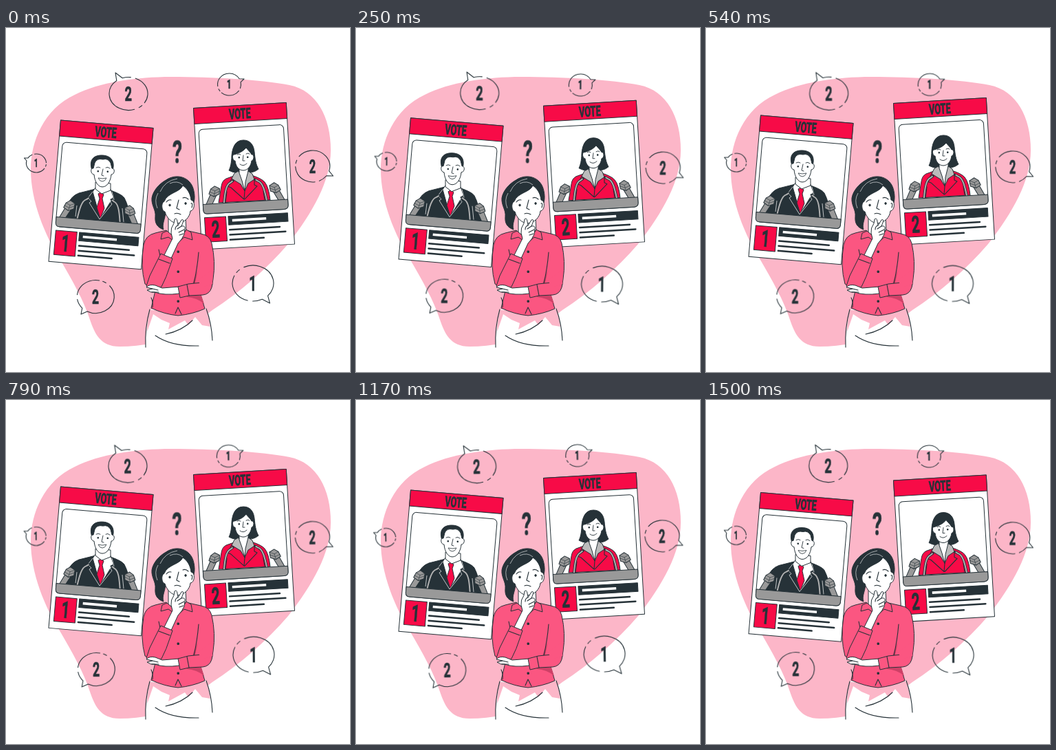
An HTML page that plays this animation: 500 by 500 pixels, repeating every 1540 ms.

```html
<!DOCTYPE html>
<html lang="en">
<head>
<meta charset="utf-8">
<title>Vote</title>
<style>
html, body { margin: 0; width: 100%; height: 100%; overflow: hidden; background: #fff; }
svg { display: block; width: 100%; height: 100%; }
.line { fill: none; stroke: #263238; stroke-width: 1.1; stroke-linecap: round; stroke-linejoin: round; }
.ink { fill: #263238; stroke: #263238; stroke-linejoin: round; }
.white { fill: #fff; stroke: #263238; stroke-linejoin: round; }
.red { fill: #f70b47; stroke: #263238; stroke-linejoin: round; }
.pink { fill: #fb5681; stroke: #263238; stroke-linejoin: round; }
.gray { fill: #999; stroke: #263238; stroke-linejoin: round; }
.shade { fill: #cf4067; }
text {
  font-family: Roboto, "Liberation Sans", sans-serif; font-weight: 700;
  text-anchor: middle; fill: #263238; stroke: #263238; stroke-width: .7;
}
.float { animation: float 1540ms linear -70ms infinite; }
.wind { transform-origin: 250px 243px; animation: wind 1540ms linear -70ms infinite; }
@keyframes float {
  0%, 100% { transform: translateY(.9px); }
  50% { transform: translateY(-9.1px); }
}
@keyframes wind {
  0%, 100% { transform: rotate(0deg); }
  25% { transform: rotate(1deg); }
  75% { transform: rotate(-1deg); }
}
</style>
</head>
<body>
<svg viewBox="0 0 500 500">
  <defs>
    <g id="card">
      <path class="white" d="M0 0H135V206H0Z"/>
      <path class="red" d="M0 0H135V23H0Z"/>
      <rect class="white" x="5.5" y="31.5" width="123.5" height="123" rx="6"/>
      <path class="red" d="M6.500 160H37.500V195.500H6.500Z"/>
      <path class="ink" stroke="none" d="M41 160H127.500V172.500H41Z"/>
      <path d="M46.500 166.200H96" stroke="#fff" stroke-width="3.6"/>
      <path class="line" style="stroke-width:2.500" d="M42 179.600H115M42 186.800H123M42 194H91"/>
    </g>
    <g id="mic">
      <path class="line" style="stroke-width:3.600" d="M51 109L47 111.500C40 114 38 128 36 141"/>
      <path class="line" style="stroke:#b3b3b3;stroke-width:1.900" d="M50 109.500L47 111.500C40 114 38 128 36 141"/>
      <path class="gray" d="M18 125L26 128L19 141H10Z"/>
      <path class="gray" d="M18 119L24 115L31 119L30 127L22 130L15 126Z"/>
      <path class="line" style="stroke-width:.6" d="M18 119L24 122L31 119M24 122L22 130M16 123L23 126L30 123"/>
    </g>
    <g id="desk">
      <use href="#mic"/>
      <use href="#mic" transform="matrix(-1 0 0 1 134.500 0)"/>
      <path class="gray" d="M5.500 140.500H129V149Q129 154.500 123 154.500H11Q5.500 154.500 5.500 149Z"/>
    </g>
  </defs>

  <path fill="#fcb6c8" d="M36 205C36 165 55 118 100 97C135 79 190 71 240 71C300 71 372 75 412 83C452 91 472 130 472 178C472 222 446 268 410 314C378 351 340 384 300 410C268 434 235 463 165 463C137 463 129 444 122 424C113 396 97 368 79 337C56 300 36 252 36 205Z"/>

  <g transform="rotate(-.18 250 243)"><g class="wind" id="bubbles"></g></g>

  <!-- first candidate -->
  <g class="float">
    <use href="#card" transform="translate(79.500 134) rotate(4.870)"/>
    <path class="ink" d="M130 234L106 240Q95 244 90 256L81 275L182 285Q179 260 172 247Q169 242 152 236Z"/>
    <path class="white" d="M130 232L126 238L137 277L156 246L152 234Z"/>
    <path class="red" d="M134 241L138 239L142 242L140 248L143 262L137 277L132 261L136 248Z"/>
    <path fill="none" stroke="#fff" stroke-width=".7" d="M126 238L119 247L124 252L121 254L136 278L154 256L151 252L157 250L154 238M103 258L101 274M169 262L171 282"/>
    <path class="white" d="M130 224V234L139 241L152 236V226Z"/>
    <path class="ink" d="M125 207C120 192 127 185 139 185C152 185 159 193 155 207Z"/>
    <path class="white" d="M127 204C122 203 123 213 128 213C129 224 134 231 140 231C147 231 152 223 153 213C158 213 159 204 154 204L152 196Q148 189 141 191Q132 189 129 196Z"/>
    <path class="line" style="stroke-width:.9" d="M131 203Q134 201 137 203M145 203Q148 201 151 204M141 205L139 214L142 215"/>
    <path class="white" stroke-width=".8" d="M134 218Q140 220 146 218Q144 223 140 223Q136 223 134 218Z"/>
    <path class="ink" stroke="none" d="M133 207.500h1.500v1.500h-1.500zM147 208h1.500v1.500h-1.500z"/>
    <use href="#desk" transform="translate(79.500 134) rotate(4.870)"/>
    <g transform="translate(79.500 134) rotate(4.870)" data-labels="VOTE,66.800,11.800,21 1,22,177.500,34"></g>
  </g>

  <!-- second candidate -->
  <g class="float">
    <use href="#card" transform="translate(272.500 116.500) rotate(-3.400)"/>
    <path class="ink" d="M345 163C333 163 329 174 328 186C328 196 326 203 324 207Q333 212 345 210Q359 212 367 205C363 198 362 190 361 180C360 170 355 163 345 163Z"/>
    <path class="red" d="M334 214L320 219Q314 222 313 230L309 254L384 250Q382 231 376 224Q372 219 357 214Z"/>
    <path class="white" d="M339 200V210L335 214L347 235L356 214L352 209V200Z"/>
    <path fill="#bbb" stroke="#263238" d="M338 208L332 211L328 219L341 227L347 237L343 222ZM352 208L358 212L361 220L352 226L347 237L348 224Z"/>
    <path class="line" d="M328 219L322 230L327 232L346 249L347 237M347 249L365 230L361 228L361 220M374 237L376 250M321 238L319 253"/>
    <path class="white" d="M332 184C328 183 329 193 333 193C334 202 339 207 345 207C351 207 356 201 357 193C361 192 361 183 357 184C355 180 352 178 349 174C344 180 338 182 332 184Z"/>
    <path class="line" style="stroke-width:.9" d="M336 184Q339 182 341 184M349 183Q352 181 354 183M345 185L344 193L347 193M340 198Q345 202 350 197"/>
    <path class="ink" stroke="none" d="M338 187.500h1.500v1.500h-1.500zM350.500 187h1.500v1.500h-1.500z"/>
    <use href="#desk" transform="translate(272.500 116.500) rotate(-3.400)"/>
    <g transform="translate(272.500 116.500) rotate(-3.400)" data-labels="VOTE,66.800,11.800,21 2,21.800,177.500,34"></g>
  </g>

  <!-- voter -->
  <g>
    <path fill="#fff" d="M209 409C204 427 202 445 203 464L222 460Q250 466 280 462L300 455Q299 430 291 408Z"/>
    <path fill="#fcb6c8" d="M209 410L291 409Q295 420 297 434L285 432L275 420L265 432L260 425L236 438L238 429L226 424L214 416L205 442Q205 424 209 410Z"/>
    <path class="line" d="M209 409C204 427 202 445 203 464M291 408Q299 430 300 454M232 445Q256 440 271 425M217 447Q240 463 280 462"/>

    <path class="ink" d="M240 218C226 222 214 235 212 247C211 258 218 264 217 274C216 284 220 290 229 293C226 285 232 277 232 266Z"/>
    <path class="white" d="M236 275V297L248 313L262 297L261 274Z"/>
    <path class="pink" d="M233 294L217 298Q203 301 200 315Q195 346 202 372L217 382L211 407Q230 416 250 418Q271 416 289 408L283 388Q300 386 301 365Q305 340 299 313Q296 301 283 299L261 294L248 312Z"/>
    <path class="shade" d="M266 389L284 389L288 401Q278 392 262 391ZM279 351L275 371L271 372Z"/>
    <path class="line" d="M222 322L224 331M280 326Q278 350 273 371M211 392Q214 398 213 406M250 406L246 415M250 406L255 416"/>
    <path class="ink" stroke="none" d="M249 324h2.400v2.400h-2.400zM249 353h2.400v2.400h-2.400zM249 396h2.400v2.400h-2.400z"/>

    <path class="ink" d="M231 266C220 250 222 226 236 219C252 211 270 219 273 237C275 246 274 253 271 259Z"/>
    <path class="white" d="M230 252C225 254 226 266 231 267C234 277 241 283 249 284C260 283 267 275 268 266C274 266 276 251 269 250C268 240 263 233 257 229C253 239 235 239 230 252Z"/>
    <path fill="none" stroke="#fff" stroke-width=".6" d="M224 238Q231 222 249 219M257 228Q249 221 238 226M221 240Q215 250 220 262"/>
    <path class="line" d="M233 253Q236 249 240 250M257 247Q261 245 265 249M251 250L248 262L252 264M245 270Q249 268 254 271M269 255Q272 254 270 261"/>
    <path class="ink" stroke="none" d="M238 256a1.200 1.500 0 1 0 .1 0zM261 253.500a1.200 1.500 0 1 0 .1 0z"/>

    <path class="pink" d="M234 295L227 298L225 307L236 304L249 313L240 300ZM262 293L269 297L271 308L259 304L249 313L257 301Z"/>
    <path class="white" d="M229 332L242 306L240 298Q239 291 244 284L245 278Q248 275 249 281L250 287L255 279Q259 277 257 283L255 288Q261 287 260 292L259 300Q256 307 250 313L239 337Z"/>
    <path class="line" d="M250 287Q246 288 246 293M255 288L249 292M259 293L251 297M258 299L252 301"/>
    <path class="pink" d="M225 328L242 335L239 344Q233 363 226 376Q215 384 204 375L209 360Z"/>
    <path class="line" d="M222 336L238 342"/>
    <path class="white" d="M252 376L227 378L217 374Q208 372 204 377L213 379L205 381Q210 385 216 384Q230 389 252 386Z"/>
    <path class="line" d="M213 379L221 381M212 384L222 384"/>
    <path class="pink" d="M250 376L265 372L284 370L295 364Q302 366 299 377Q296 387 286 388L266 389L253 392Z"/>
    <path class="line" d="M263 373L266 389"/>
    <path fill="#fb5681" d="M279 367L301 350L300 372L285 377Z"/>
  </g>
</svg>
<script>
const NARROW = 0.61;

// Condensed lettering centred on x, y
const label = (str, x, y, size) =>
  `<text transform="translate(${x} ${y + size * 0.355}) scale(${NARROW} 1)" font-size="${size}">${str}</text>`;

// Speech bubble: a broken ellipse that runs out to the tail tip and back
function bubble(num, x, y, rx, ry, tipX, tipY, size) {
  const a = Math.atan2((tipY - y) / ry, (tipX - x) / rx);
  const at = t => `${(x + rx * Math.cos(t)).toFixed(2)} ${(y + ry * Math.sin(t)).toFixed(2)}`;
  const d = `M${tipX} ${tipY}L${at(a + 0.17)}A${rx} ${ry} 0 1 1 ${at(a - 0.17)}L${tipX} ${tipY}`;
  return `<path class="line" pathLength="100" stroke-dasharray="14 4 25 3 3 4 47 0" d="${d}"/>` +
    label(num, x - 0.3, y, size);
}

document.getElementById('bubbles').innerHTML = [
  bubble('2', 178, 95.5, 28, 24, 159, 65, 30),
  bubble('1', 324.5, 82, 17, 16, 346, 74, 18),
  bubble('1', 44, 196.5, 14.5, 13.5, 26.5, 189, 16),
  bubble('2', 445.7, 201, 25, 23, 475.5, 215, 27),
  bubble('1', 359, 371, 30, 26, 383.5, 400, 31),
  bubble('2', 130.3, 390.5, 27, 24, 109, 416, 29),
  label('?', 249, 180, 46)
].join('');

for (const g of document.querySelectorAll('[data-labels]'))
  g.innerHTML = g.dataset.labels.split(' ').map(s => {
    const [str, ...n] = s.split(',');
    return label(str, ...n.map(Number));
  }).join('');
</script>
</body>
</html>
```
